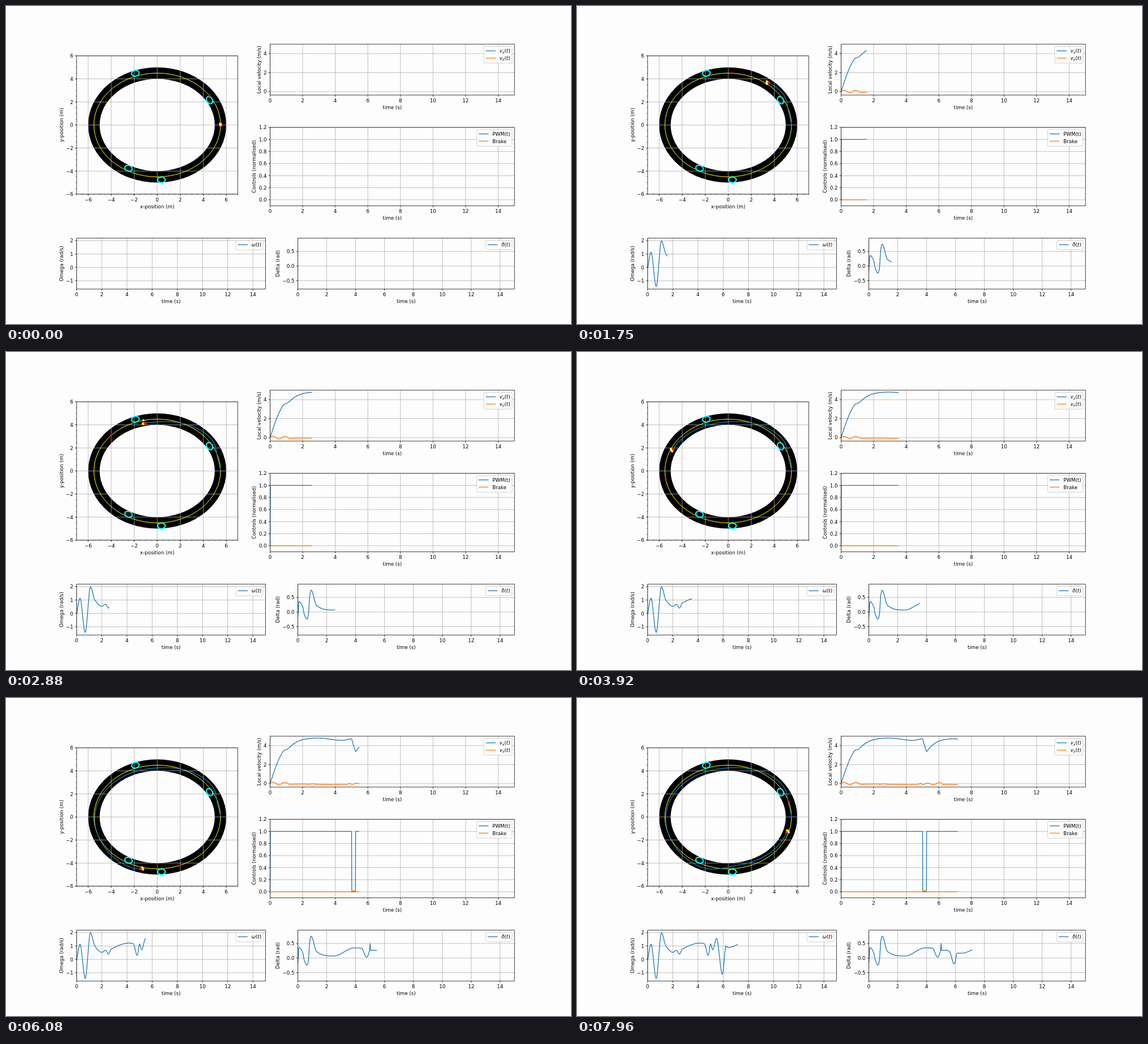
Write an HTML page with a canvas that moves like this. It is 998 by 561 pixels and loops after 8 s.

```html
<!DOCTYPE html>
<html lang="en">
<head>
<meta charset="utf-8">
<title>Vehicle telemetry</title>
<style>
  html, body { margin: 0; width: 100%; height: 100%; overflow: hidden; background: #fdfdfd; }
  canvas { display: block; }
</style>
</head>
<body>
<canvas id="stage" width="998" height="561"></canvas>
<script>
const ctx = document.getElementById('stage').getContext('2d');
const FRAMES = 192, FPS = 24, STEPS_PER_FRAME = 3, DT = 0.0125;
const FONT = 8.67, PAPER = '#fdfdfd', BLUE = '#1f77b4', ORANGE = '#ff7f0e';
const range = (from, to, step) =>
  Array.from({ length: Math.round((to - from) / step) + 1 }, (_, i) => from + i * step);

// Smooth curve through key points; it turns only at the points themselves.
function through(...points) {
  const slope = i => (points[i + 1][1] - points[i][1]) / (points[i + 1][0] - points[i][0]);
  const tangent = points.map((_, i) => {
    if (i === 0) return slope(0);
    if (i === points.length - 1) return slope(i - 1);
    const a = slope(i - 1), b = slope(i);
    return a * b <= 0 ? 0 : 2 * a * b / (a + b);
  });
  return x => {
    let i = 0;
    while (i < points.length - 2 && x > points[i + 1][0]) i++;
    const [x0, y0] = points[i], [x1, y1] = points[i + 1];
    const h = x1 - x0, u = (x - x0) / h, w = 1 - u;
    return w * w * ((1 + 2 * u) * y0 + u * h * tangent[i])
         + u * u * ((3 - 2 * u) * y1 - w * h * tangent[i + 1]);
  };
}

// Driver: swerves, recoveries and one short braking.
const steering = through([0, -.17], [.08, .36], [.35, .17], [.42, -.03], [.63, -.24], [.72, -.12],
  [.84, .62], [.92, .75], [1.3, .22], [2, .08], [2.5, .07], [3.9, .35], [4.4, .34], [4.76, .03],
  [4.97, .27], [5, .5], [5.03, .26], [5.3, .27], [5.55, .24], [5.92, -.2], [6.12, .17], [6.5, .17], [7.2, .29]);
const yawRate = through([0, -.05], [.27, 1.13], [.68, -1.41], [1.1, 1.98], [1.45, 1], [2, .53], [2.3, .68],
  [2.53, .4], [2.75, .77], [4.2, 1.22], [4.5, 1.17], [4.81, .3], [5, 1.15], [5.17, .72], [5.47, 1.56],
  [5.94, -1.1], [6.22, 1], [6.4, .88], [7.2, 1.13]);
const braking = t => t > 5.01 && t < 5.24;

// Distance from the track centre (px, outward) by angle along the track.
const drift = through([0, 0], [.22, -2], [.6, 5.5], [1.75, -5.6], [3.5, 0], [4.3, 5.3], [4.9, -5.5], [6, -3]);

const UNIT = 20.33, TRACK = { x: 267.1, y: 209.9, rx: 5.5 * UNIT, ry: 4.5 * UNIT };
function trackPoint(angle, out = 0) {
  const nx = TRACK.ry * Math.cos(angle), ny = TRACK.rx * Math.sin(angle), len = Math.hypot(nx, ny);
  return [TRACK.x + TRACK.rx * Math.cos(angle) + out * nx / len,
          TRACK.y - TRACK.ry * Math.sin(angle) - out * ny / len];
}
const carPoint = angle => trackPoint(angle, drift(angle));

// Integrates motor power, air drag, cornering drag and brakes, then moves along the path.
function simulate() {
  const POWER = 5.3, TOP_SPEED = 4.85, CORNERING = .27, BRAKES = 80, H = .001;
  const states = [];
  let speed = 0, angle = 0;
  for (let i = 0; i <= FRAMES * STEPS_PER_FRAME; i++) {
    const t = i * DT, steer = steering(t), yaw = yawRate(t);
    const yawChange = (yawRate(t + H) - yawRate(t - H)) / (2 * H);
    const throttle = t > 0 && !braking(t) ? 1 : 0, brake = braking(t) ? .02 : 0;
    const slide = yaw * (.12 - .0095 * speed ** 2) + .011 * yawChange;
    states.push({ t, steer, yaw, throttle, brake, speed, slide, angle, point: carPoint(angle) });

    const drive = braking(t) ? 0 : POWER;
    const gain = drive - POWER * (speed / TOP_SPEED) ** 2 - CORNERING * (speed * steer) ** 2 - BRAKES * brake;
    const [x, y] = carPoint(angle), [ax, ay] = carPoint(angle + H);
    angle += (speed + gain * DT / 2) * DT * UNIT * H / Math.hypot(ax - x, ay - y);
    speed += gain * DT;
  }
  return states;
}
const states = simulate();

const time = range(0, 14, 2);
const plots = [
  { left: 124.75, right: 409.4, top: 87.9, bottom: 331.9, x0: TRACK.x, y0: TRACK.y, sx: UNIT, sy: UNIT,
    xTicks: range(-6, 6, 2), yTicks: range(-6, 6, 2), digits: 0,
    xLabel: 'x-position (m)', yLabel: 'y-position (m)', yLabelX: 101, minor: true, under: drawTrack, over: drawCar },
  { left: 466.5, right: 898.2, top: 67.3, bottom: 157.1, y0: 151, sy: 16.74, yTicks: [0, 2, 4], digits: 0,
    yLabel: 'Local velocity (m/s)', yLabelX: 450,
    series: ['speed', 'slide'], legend: ['v_x', 'v_y'], legendX: 847.5, legendY: 79.1 },
  { left: 466.5, right: 898.2, top: 214.1, bottom: 352.5, y0: 341.9, sy: 106.5, yTicks: range(0, 1.2, .2), digits: 1,
    yLabel: 'Controls (normalised)', yLabelX: 441,
    series: ['throttle', 'brake'], legend: ['PWM(t)', 'Brake'], legendX: 835, legendY: 225.6 },
  { left: 124.75, right: 458.4, top: 409.5, bottom: 499.3, y0: 461.2, sy: 23.65, yTicks: [-1, 0, 1, 2], digits: 0,
    yLabel: 'Omega (rad/s)', yLabelX: 100.5,
    series: ['yaw'], legend: ['ω_'], legendX: 409.5, legendY: 421.2 },
  { left: 515.5, right: 898.2, top: 409.5, bottom: 499.3, y0: 458.8, sy: 51.5, yTicks: [-.5, 0, .5], digits: 1,
    yLabel: 'Delta (rad)', yLabelX: 483,
    series: ['steer'], legend: ['δ_'], legendX: 851, legendY: 421.2 }
].map(p => ({ x0: p.left, sx: (p.right - p.left) / 15, xTicks: time, xLabel: 'time (s)', ...p }));

const setFont = (style = '', size = FONT) => ctx.font = `${style} ${size}px "DejaVu Sans", sans-serif`;
function pen(color, width) { ctx.strokeStyle = color; ctx.lineWidth = width; }
function line(x1, y1, x2, y2) {
  ctx.beginPath(); ctx.moveTo(x1, y1); ctx.lineTo(x2, y2); ctx.stroke();
}
function ellipse(x, y, rx, ry, turn = 0) {
  ctx.beginPath(); ctx.ellipse(x, y, rx, ry, turn, 0, 2 * Math.PI);
}
function dot([x, y], r, color) { ctx.fillStyle = color; ellipse(x, y, r, r); ctx.fill(); }
function trace(history, toPoint) {
  if (history.length < 2) return;
  ctx.beginPath();
  for (const state of history) ctx.lineTo(...toPoint(state));
  ctx.stroke();
}

function drawTrack() {
  for (const [grow, color] of [[.5, '#000'], [-.5, PAPER]]) {
    ctx.fillStyle = color;
    ellipse(TRACK.x, TRACK.y, TRACK.rx + grow * UNIT, TRACK.ry + grow * UNIT);
    ctx.fill();
  }
}

function drawCar(history) {
  const { angle, point: [x, y] } = history.at(-1), [ax, ay] = carPoint(angle + .01);
  pen('#ff0', 1);
  ellipse(TRACK.x, TRACK.y, TRACK.rx, TRACK.ry);
  ctx.stroke();

  pen('#0ff', 2.1);
  for (const [ox, oy, turn] of [[228.5, 118.6, -.2], [359.6, 166.2, 1], [216.4, 286.2, .35], [274.5, 306.6, 0]]) {
    ellipse(ox, oy, 6.8, 5, turn);
    ctx.stroke();
  }

  pen(BLUE, 1.3);
  trace(history, state => state.point);
  dot(trackPoint(angle + .6), 2.1, '#f00');

  ctx.save();
  ctx.translate(x, y);
  ctx.rotate(Math.atan2(ay - y, ax - x));
  ctx.fillStyle = '#e81020'; ctx.fillRect(-4, -2.5, 4, 5);
  ctx.fillStyle = '#ffe000'; ctx.fillRect(0, -2.5, 4, 5);
  ctx.restore();
  dot(trackPoint(angle), 1.9, '#fff');
}

function drawGrid(p) {
  pen('#b0b0b0', .8);
  for (const v of p.xTicks) line(p.x0 + v * p.sx, p.top, p.x0 + v * p.sx, p.bottom);
  for (const v of p.yTicks) line(p.left, p.y0 - v * p.sy, p.right, p.y0 - v * p.sy);
}

function drawTicks(p, xValues, yValues, length) {
  for (const v of xValues) line(p.x0 + v * p.sx, p.bottom, p.x0 + v * p.sx, p.bottom + length);
  for (const v of yValues) line(p.left, p.y0 - v * p.sy, p.left - length, p.y0 - v * p.sy);
}

function drawAxes(p) {
  const number = (v, digits) => v.toFixed(digits).replace('-', '\u2212');
  pen('#000', .75);
  ctx.fillStyle = '#000';
  setFont();
  ctx.strokeRect(p.left, p.top, p.right - p.left, p.bottom - p.top);
  drawTicks(p, p.xTicks, p.yTicks, 3);
  if (p.minor) {
    pen('#000', .52);
    drawTicks(p, range(-7, 7, .5), range(-6, 6, .5), 1.75);
  }
  ctx.textAlign = 'right';
  for (const v of p.yTicks) ctx.fillText(number(v, p.digits), p.left - 6, p.y0 - v * p.sy + 3.3);
  ctx.textAlign = 'center';
  for (const v of p.xTicks) ctx.fillText(number(v, 0), p.x0 + v * p.sx, p.bottom + 12.8);
  ctx.fillText(p.xLabel, (p.left + p.right) / 2, p.bottom + 24.6);
  ctx.save();
  ctx.translate(p.yLabelX, (p.top + p.bottom) / 2);
  ctx.rotate(-Math.PI / 2);
  ctx.fillText(p.yLabel, 0, 0);
  ctx.restore();
}

// "v_x" is set as an italic symbol with a subscript, followed by (t).
function drawLabel(label, x, y) {
  const [symbol, sub] = label.split('_');
  const runs = sub === undefined ? [[symbol, '']]
    : [[symbol, 'italic'], [sub, 'italic', FONT * .7, 1.4], ['(', ''], ['t', 'italic'], [')', '']];
  ctx.textAlign = 'left';
  for (const [text, style, size, drop = 0] of runs) {
    setFont(style, size);
    ctx.fillText(text, x, y + drop);
    x += ctx.measureText(text).width;
  }
}

function drawLegend(p) {
  const left = p.legendX - 3.5, top = p.legendY - 7.5;
  ctx.fillStyle = 'rgba(255,255,255,.8)';
  pen('#ccc', .87);
  ctx.beginPath();
  ctx.roundRect(left, top, p.right - 4.4 - left, 16.3 + 12.9 * (p.legend.length - 1), 1.8);
  ctx.fill();
  ctx.stroke();
  p.legend.forEach((label, i) => {
    const y = p.legendY + i * 12.8;
    pen([BLUE, ORANGE][i], 1.3);
    line(p.legendX, y, p.legendX + 17.4, y);
    ctx.fillStyle = '#000';
    drawLabel(label, p.legendX + 24.2, y + 3.1);
  });
}

function draw(frame) {
  const history = states.slice(0, frame * STEPS_PER_FRAME + 1);
  ctx.fillStyle = PAPER;
  ctx.fillRect(0, 0, 998, 561);
  ctx.lineJoin = 'round';
  for (const p of plots) {
    p.under?.();
    drawGrid(p);
    p.over?.(history);
    p.series?.forEach((key, i) => {
      pen([BLUE, ORANGE][i], 1.3);
      trace(history, state => [p.x0 + state.t * p.sx, p.y0 - state[key] * p.sy]);
    });
    drawAxes(p);
    if (p.legend) drawLegend(p);
  }
}

const start = performance.now();
function tick() {
  const elapsed = performance.now() - start;
  draw(Math.floor((elapsed + 5) * FPS / 1000) % FRAMES);
  requestAnimationFrame(tick);
}
tick();
</script>
</body>
</html>
```
